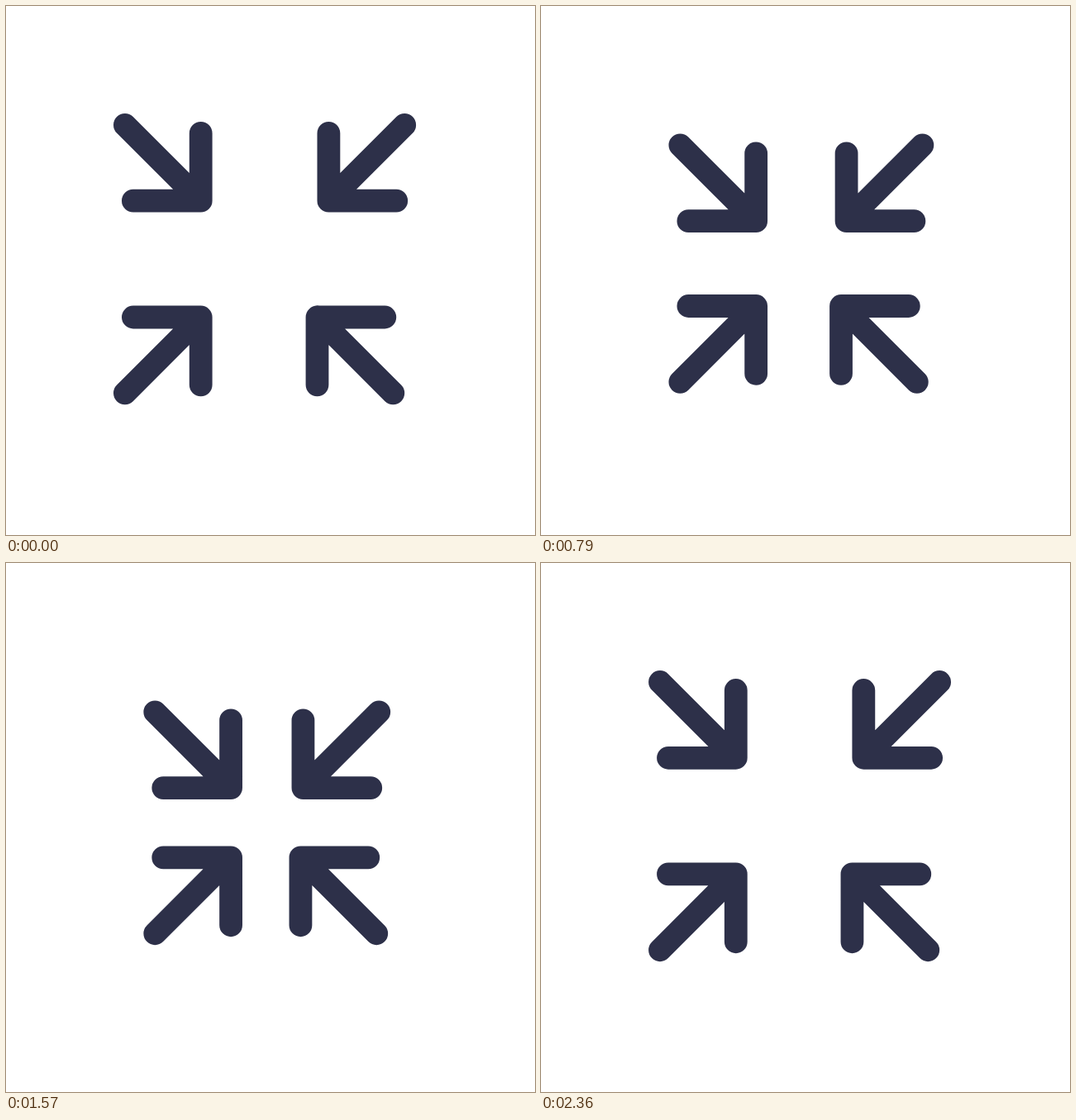
An HTML page for the animation above (2.43 s loop, 640 px wide and 640 px high).

```html
<!DOCTYPE html>
<html lang="en">
<head>
<meta charset="utf-8">
<title>Converging arrows</title>
<style>
html, body { margin: 0; height: 100%; overflow: hidden; background: #fff; }
svg { display: block; width: 100%; height: 100%; }
path { fill: none; stroke: #2d3049; stroke-width: 27.8; stroke-linecap: round; stroke-linejoin: round; }
</style>
</head>
<body>
<svg id="stage" viewBox="0 0 640 640"></svg>
<script>
const LOOP = 2430, FPS = 14, STEPS = 34;
const TURN = 1190, END = 2390;
const ARROW = "M-81.8 0H0V-81.8M0 0L-91.8 -91.8";

// Tip position, travel at full progress, and mirroring of each arrow
const arrows = [
  { x: 235.7, y: 235.7, dx: 47.7, dy: 47.7, flip: "1 1" },
  { x: 390.4, y: 235.7, dx: -40.6, dy: 47.7, flip: "-1 1" },
  { x: 235.7, y: 376.5, dx: 47.7, dy: -26.3, flip: "1 -1" },
  { x: 376.5, y: 376.5, dx: -26.3, dy: -26.3, flip: "-1 -1" }
];

for (const a of arrows) {
  a.el = document.createElementNS("http://www.w3.org/2000/svg", "path");
  a.el.setAttribute("d", ARROW);
  document.getElementById("stage").append(a.el);
}

// Cubic Bezier easing with flat ends: (a, 0, b, 1)
function ease(u, a, b) {
  let lo = 0, hi = 1;
  for (let i = 0; i < 30; i++) {
    const s = (lo + hi) / 2, r = 1 - s;
    if (3 * r * r * s * a + 3 * r * s * s * b + s ** 3 < u) lo = s;
    else hi = s;
  }
  return lo * lo * (3 - 2 * lo);
}

function progress(t) {
  if (t < TURN) return ease(t / TURN, 0.71, 0.71);
  if (t < END) return 1 - ease((t - TURN) / (END - TURN), 1 / 3, 2 / 3);
  return 0;
}

function draw(now) {
  const step = Math.min(STEPS - 1, Math.floor((now % LOOP + 5) * FPS / 1000));
  const p = progress(Math.round(step * 100 / FPS) * 10);
  for (const { el, x, y, dx, dy, flip } of arrows)
    el.setAttribute("transform", `translate(${x + dx * p} ${y + dy * p}) scale(${flip})`);
}

let start;
function tick(now) {
  start ??= now;
  draw(now - start);
  requestAnimationFrame(tick);
}
draw(0);
requestAnimationFrame(tick);
</script>
</body>
</html>
```
